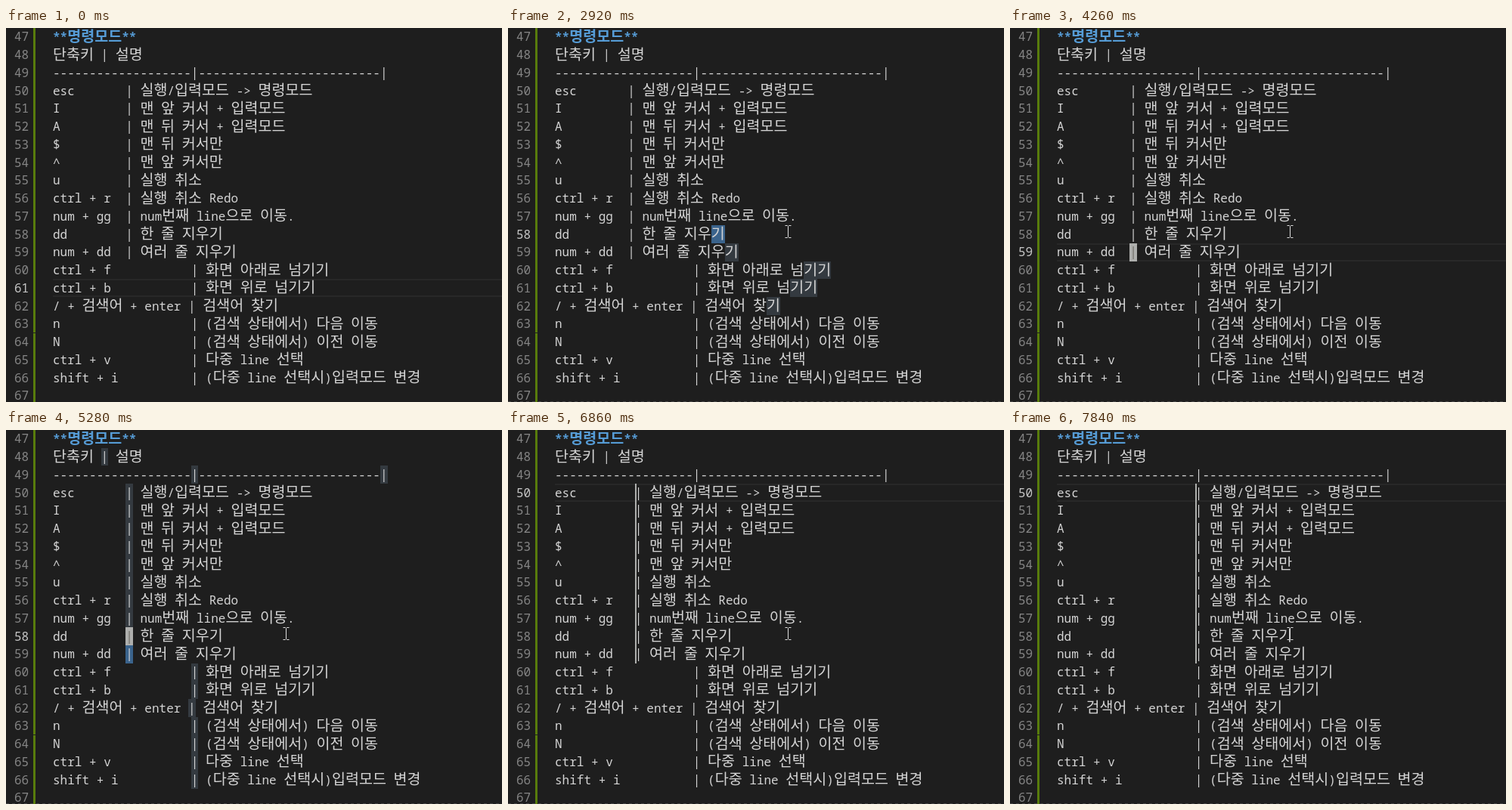
An HTML page with a canvas that plays this animation: 656x495 px, repeating every 8 s.

```html
<!DOCTYPE html>
<html lang="ko">
<head>
<meta charset="utf-8">
<title>명령모드</title>
<style>
  html, body { margin: 0; width: 656px; height: 495px; overflow: hidden; background: #1e1e1e; }
  canvas { display: block; }
</style>
</head>
<body>
<canvas id="stage" width="656" height="495"></canvas>
<script>
const ctx = document.getElementById('stage').getContext('2d');
const LOOP = 8000, FIRST = 47, LEFT = 62, ROW_H = 23.75, CELL = 9.62, WIDE = 18;
const LATIN = '16.04px "Noto Sans Mono", "DejaVu Sans Mono", monospace';
const HANGUL = '19.57px "Noto Sans CJK KR", "Noto Sans CJK JP", sans-serif';
const GREY = '#aeafad', INK = '#d4d4d4', SELECTED = '#264f78', MATCH = 'rgba(173,214,255,.15)';

const headRows = ['**명령모드**', '단축키 | 설명', '-'.repeat(19) + '|' + '-'.repeat(25) + '|'];
const blockRows = [
  ['esc', '실행/입력모드 -> 명령모드'],
  ['I', '맨 앞 커서 + 입력모드'],
  ['A', '맨 뒤 커서 + 입력모드'],
  ['$', '맨 뒤 커서만'],
  ['^', '맨 앞 커서만'],
  ['u', '실행 취소'],
  ['ctrl + r', '실행 취소 Redo'],
  ['num + gg', 'num번째 line으로 이동.'],
  ['dd', '한 줄 지우기'],
  ['num + dd', '여러 줄 지우기']
];
const tailRows = [
  ['ctrl + f', '화면 아래로 넘기기'],
  ['ctrl + b', '화면 위로 넘기기'],
  ['/ + 검색어 + enter ', '검색어 찾기'],
  ['n', '(검색 상태에서) 다음 이동'],
  ['N', '(검색 상태에서) 이전 이동'],
  ['ctrl + v', '다중 line 선택'],
  ['shift + i', '(다중 line 선택시)입력모드 변경']
];

// Caret moves: time, line number, character index
const moves = [
  [0, 61, -1], [2450, 58, 19], [3200, 58, 18],
  [3520, 59, 18], [3590, 59, 17], [3670, 59, 16],
  [3920, 59, 15], [3960, 59, 14], [4010, 59, 12], [4050, 59, 11], [4260, 59, 10],
  [5280, 58, 10],
  ...Array.from({ length: 7 }, (_, k) => [5530 + 33 * k, 57 - k, 10]),
  [5940, 50, 10]
];
const spaceTimes = [6860, 7110, 7150, 7190, 7230, 7230, 7270, 7630, 7840];

const within = (t, a, b) => t >= a && t < b;
const isHangul = c => c >= '가' && c <= '힣';
const widthOf = c => isHangul(c) ? WIDE : CELL;
const xAt = (text, i) => [...text.slice(0, i)].reduce((x, c) => x + widthOf(c), LEFT);
const rowTop = line => (line - FIRST) * ROW_H - 0.25;

function fill(color, x, y, w, h) {
  ctx.fillStyle = color;
  ctx.fillRect(x, y, w, h);
}

function write(text, x, line, color, bold) {
  ctx.fillStyle = color;
  for (const c of text) {
    const wide = isHangul(c);
    ctx.font = (bold ? 'bold ' : wide ? '300 ' : '') + (wide ? HANGUL : LATIN);
    ctx.fillText(c, x, rowTop(line) + (wide ? 18 : 17.5));
    x += widthOf(c);
  }
}

function cell(text, line, index, length, color) {
  const x = Math.round(xAt(text, index));
  const end = index < text.length ? Math.round(xAt(text, index + length)) : x + 10;
  const y = Math.round(rowTop(line));
  fill(color, x, y, end - x, Math.round(rowTop(line + 1)) - y);
}

function markAll(rows, word) {
  rows.forEach((text, i) => {
    for (let at = text.indexOf(word); at >= 0; at = text.indexOf(word, at + word.length))
      cell(text, FIRST + i, at, word.length, MATCH);
  });
}

function drawPointer(t) {
  if (t < 2160) return;
  const p = Math.min(1, Math.floor((t - 2160) / 41) / 6);
  const e = p * p * (3 - 2 * p);
  ctx.save();
  ctx.translate(Math.round(585 - 215 * e) + 0.5, Math.round(236 + 33 * e) + 0.5);
  ctx.strokeStyle = '#dedede';
  ctx.lineWidth = 1;
  ctx.stroke(new Path2D('M-4-8h3l1 1 1-1h3M0-7V7M-4 8h3l1-1 1 1h3'));
  ctx.restore();
}

function draw(t) {
  const shift = spaceTimes.filter(s => s <= t).length;
  const rows = [
    ...headRows,
    ...blockRows.map(([key, info]) => key.padEnd(10 + shift) + '| ' + info),
    ...tailRows.map(([key, info]) => key.padEnd(key[0] === '/' ? 0 : 19) + '| ' + info),
    ''
  ];
  const [, line, col] = moves.filter(m => m[0] <= t).pop();
  const text = rows[line - FIRST];
  const picked = within(t, 2450, 3200);
  const column = within(t, 5100, 6430);
  const inserting = t >= 6430;

  fill('#1e1e1e', 0, 0, 656, 495);
  if (!picked && !column) {
    fill('#282828', LEFT, Math.round(rowTop(line)), 594, 2);
    fill('#282828', LEFT, Math.round(rowTop(line + 1)) - 2, 594, 2);
  }

  if (picked) {
    cell(text, 58, 18, 1, SELECTED);
    markAll(rows, '기');
  }
  if (within(t, 3450, 3520)) markAll(rows, '지우기');
  if (column)
    for (let n = line; n <= 59; n++) cell(rows[n - FIRST], n, 10, 1, SELECTED);
  if (within(t, 5100, 6530)) markAll(rows, '|');

  rows.forEach((row, i) => {
    const n = FIRST + i;
    write(String(n), 11, n, n === line ? '#c6c6c6' : '#858585');
    write(row, LEFT, n, i ? INK : '#569cd6', !i);
  });
  fill('#587c0c', 36, 0, 3, 495);
  fill('#1e1e1e', 36, 403, 3, 1);

  const blinkedOff = within(t, 2920, 3200) || within(t, 4720, 5100);
  if (inserting) {
    const x = Math.round(LEFT + (10 + shift) * CELL);
    const y = Math.round(rowTop(50));
    fill(GREY, x, y, 2, Math.round(rowTop(60)) - y);
  } else if (col >= 0 && !blinkedOff) {
    const c = text[col] || '';
    cell(text, line, col, 1, GREY);
    write(c, xAt(text, col), line, isHangul(c) ? '#e4e4e4' : '#6f6d66');
  }

  if (t >= 920)
    for (let x = 0; x < 651; x += 8) fill('#444', x, 494, 4, 1);
  drawPointer(t);
}

const began = performance.now();
function tick() {
  draw((performance.now() - began) % LOOP);
  requestAnimationFrame(tick);
}
tick();
</script>
</body>
</html>
```
